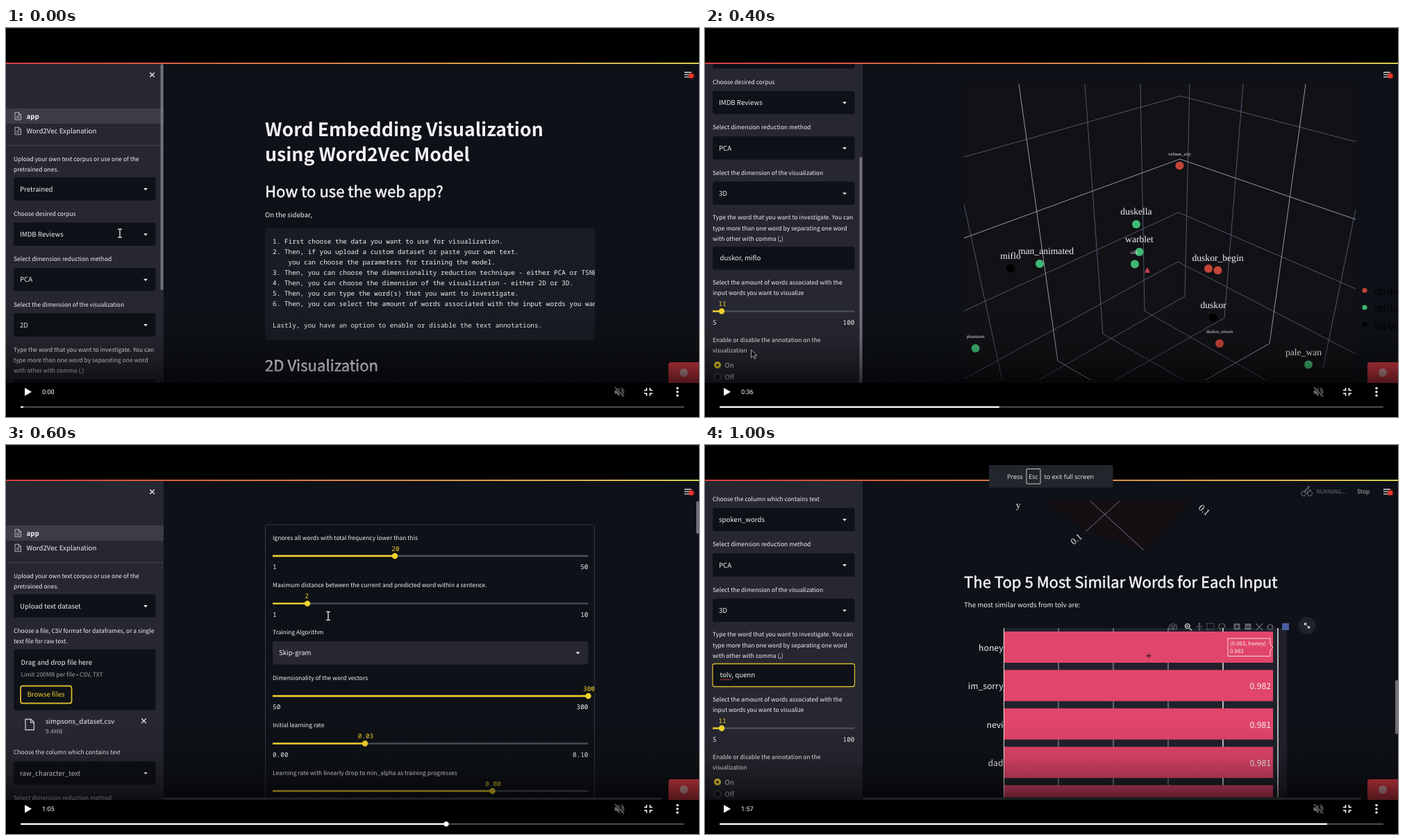
These frames come from a looping animation (998 px wide and 561 px high, 1.2 s). An HTML page:

```html
<!DOCTYPE html>
<html lang="en">
<head>
<meta charset="utf-8">
<title>Word embedding demo</title>
<style>
html, body { margin: 0; height: 100%; overflow: hidden; background: #000; }
svg { display: block; }
#stage { width: 100vw; height: 100vh; }
text { font-family: "Noto Sans CJK JP", "Noto Sans CJK SC", "Noto Sans CJK", "Noto Sans", sans-serif; fill: #f2f2f4; white-space: pre; text-rendering: geometricPrecision; }
.m { font-family: "Noto Sans Mono", "Liberation Mono", monospace; }
.s { font-family: "Liberation Serif", "Noto Serif", serif; }
.r { font-family: Roboto, sans-serif; }
.o { font-family: "Open Sans", sans-serif; }
.c { text-anchor: middle; }
.e { text-anchor: end; }
.b { font-weight: 700; }
.h { stroke: #f2f2f4; stroke-width: .55; }
</style>
</head>
<body>
<svg id="stage" viewBox="0 0 998 561"></svg>
<script>
const BG = '#0e1117', SIDE = '#262730', YEL = '#f2d32c', GOLD = '#d6b82e', RED = '#c24537', GRN = '#3fb873', PINK = '#e2456a';
const LABEL = 8.47, BODY = 9.68, HEAD = 22.1, MONO = 9.4;

const text = (x, y, s, size = LABEL, cls = '', extra = '') =>
  `<text x="${x}" y="${y}" font-size="${size}" class="${cls}" ${extra}>${s}</text>`;
const rect = (x, y, w, h, fill, extra = '') =>
  `<rect x="${x}" y="${y}" width="${w}" height="${h}" fill="${fill}" ${extra}/>`;
const dot = (x, y, r, fill, extra = '') => `<circle cx="${x}" cy="${y}" r="${r}" fill="${fill}" ${extra}/>`;
const path = (d, stroke, w = 1, fill = 'none') => `<path d="${d}" stroke="${stroke}" stroke-width="${w}" fill="${fill}"/>`;
const poly = (points, fill) => `<polygon points="${points}" fill="${fill}"/>`;
const clip = (x, y, w, h, body) =>
  `<svg x="${x}" y="${y}" width="${w}" height="${h}" viewBox="${x} ${y} ${w} ${h}">${body}</svg>`;
const lines = (x, y, step, rows, size, cls) => rows.map((s, i) => text(x, y + i * step, s, size, cls)).join('');
const move = (x, y, body) => `<g transform="translate(${x} ${y})">${body}</g>`;
const heading = (y, s) => text(373, y, s, HEAD, 'h');

const arrow = (x, y) => poly(`${x - 3},${y - 1.4} ${x + 3},${y - 1.4} ${x},${y + 1.8}`, '#f2f2f4');
const select = (cy, s) => rect(11, cy - 16.7, 204.5, 33.4, BG, 'rx="3"') + text(20, cy + 3.6, s, BODY) + arrow(201, cy + .5);
const field = (cy, s, focus) =>
  rect(11, cy - 16.5, 204.5, 33, BG, `rx="3" ${focus ? `stroke="${GOLD}" stroke-width="1.3"` : ''}`) + s;
const slider = (y, x0, x1, x, val, lo, hi) =>
  path(`M${x0} ${y}H${x1}`, '#4c4e57', 2.4) + path(`M${x0} ${y}H${x}`, YEL, 2.4) + dot(x, y, 4.2, YEL) +
  text(x + (val.length > 1 ? 1 : -1), y - 7.5, val, MONO, 'm c', `style="fill:${YEL}"`) +
  text(x0, y + 19, lo, MONO, 'm') + text(x1, y + 19, hi, MONO, 'm e');
const pointer = (x, y) => move(x, y, path('M0 0V11.5L2.8 9L4.8 13.2L6.6 12.3L4.7 8.3H8.3Z', '#ddd', 1, '#111'));
const caret = (x, y) => path(`M${x - 3} ${y - 6}H${x + 3}M${x} ${y - 6}V${y + 6}M${x - 3} ${y + 6}H${x + 3}`, '#ccc', 1.6);
const page = (x, y, k = 1) => move(x, y, `<g transform="scale(${k})">` +
  path('M0 0H5.5L8.5 3V10.5H0ZM5.2 0V3.3H8.5' + (k > 1 ? '' : 'M2 5.5H6.5M2 7.8H6.5'), '#c8c8cc', .9) + '</g>');
const cross = (x, y, r) => path(`M${x - r} ${y - r}l${2 * r} ${2 * r}m0 ${-2 * r}l${-2 * r} ${2 * r}`, '#eee', 1.3);
const bar = (x, y, h) => rect(x, y, 4, h, '#70717a', 'rx="2"');
const hbar = rect(227, 508.5, 718, 3, '#55565e', 'rx="1.5"');

const PICK = 'Select dimension reduction method', DIM = 'Select the dimension of the visualization';
const TYPE = ['Type the word that you want to investigate. You can', 'type more than one word by separating one word', 'with other with comma (,)'];

function sideTop() {
  return cross(210.5, 67.5, 3.3) + rect(0, 116, 227, 22, '#3b3c47') + page(13, 121.8) + page(13, 143.2) +
    text(29.5, 130.6, 'app', BODY, 'b') + text(29.5, 152, 'Word2Vec Explanation', BODY) +
    path('M0 169.5H227', '#41424b') +
    lines(11, 191.8, 15.2, ['Upload your own text corpus or use one of the', 'pretrained ones.']);
}

function sideTail(dy, title, corpus, dim, input, focus, x, val) {
  const radio = (y, s, on) => dot(18, y, 5, on ? YEL : '#1b1c23', on ? '' : 'stroke="#777"') +
    (on ? dot(18, y, 1.8, SIDE) : '') + text(28.5, y + 3.6, s, BODY);
  return move(0, dy, text(11, 81, title) + select(107.5, corpus) + text(11, 146.3, PICK) + select(173, 'PCA') +
    text(11, 211.6, DIM) + select(238.3, dim) + lines(11, 276.4, 15.1, TYPE) + field(332, input, focus) +
    lines(11, 370.2, 15.1, ['Select the amount of words associated with the', 'input words you want to visualize']) +
    slider(408.5, 11, 215.5, x, val, '5', '100') +
    lines(11, 453, 15.1, ['Enable or disable the annotation on the', 'visualization']) +
    radio(486, 'On', true) + radio(503.5, 'Off', false));
}

const scene = (side, main) => rect(0, 52, 998, 460, BG) + main + rect(0, 52, 227, 460, SIDE) + clip(0, 52, 227, 460, side) +
  path('M977 64H987M977 67.3H987M977 70.6H987', '#ddd', 1.3) + dot(987, 69, 5, '#ff2a20', 'opacity=".3"') + dot(987, 69, 3.2, '#f0352b');

function intro() {
  const steps = ['1. First choose the data you want to use for visualization.',
    '2. Then, if you upload a custom dataset or paste your own text.',
    '    you can choose the parameters for training the model.',
    '3. Then, you can choose the dimensionality reduction technique - either PCA or TSNE.',
    '4. Then, you can choose the dimension of the visualization - either 2D or 3D.',
    '5. Then, you can type the word(s) that you want to investigate.',
    '6. Then, you can select the amount of words associated with the input words you want.', '',
    'Lastly, you have an option to enable or disable the text annotations.'];
  const side = sideTop() + select(232, 'Pretrained') + text(11, 271, 'Choose desired corpus') + select(297.3, 'IMDB Reviews') +
    text(11, 336.4, PICK) + select(362.6, 'PCA') + text(11, 401.6, DIM) + select(428, '2D') +
    lines(11, 466.6, 15.1, TYPE) + field(523, '') + bar(222.5, 52, 326) + caret(164, 296);
  return scene(side, lines(373, 156, 35.6, ['Word Embedding Visualization', 'using Word2Vec Model'], 26.7, 'b') +
    heading(243.6, 'How to use the web app?') + text(373, 272.6, 'On the sidebar,', BODY) +
    clip(373, 289, 475, 161, rect(373, 289, 475, 161, '#1a1c24', 'rx="3"') + lines(384, 310.8, 15.1, steps, MONO, 'm')) +
    heading(494.5, '2D Visualization'));
}

function scatter() {
  const words = [[537, 90, ''], [644, 92, ''], [769, 183, 'captivated'], [656, 206, 'cabot'], [562, 214, 'anchorman'],
    [609, 215.5, 'indigenous'], [899, 236, 'cleaning'], [585, 239, 'unsatisfied'], [560, 243, 'dialogue_br'],
    [458, 254.5, 'python'], [472.5, 253.5, 'lionel'], [677, 266, 'sympathetically'], [632, 290, 'sherwood'],
    [648, 286, 'baked'], [657, 287, 'naked'], [643, 304.5, 'understated_performance'], [715, 303.5, 'propelled'],
    [601, 310.5, 'deep'], [539, 306, 'aria'], [669, 323.5, 'rebellious'], [656, 329, 'observant'], [609, 329, 'copy'],
    [611, 328, 'wear'], [611, 367, 'wont'], [615, 382, 'acquiring'], [565, 386, 'calling'], [482, 381.5, 'mocked'],
    [503, 388, 'elected'], [423, 391, 'line_delivered'], [501, 418, 'tragic_event'], [692, 408, 'periodically'],
    [622, 447, 'observed'], [529, 476, 'udo_benno'], [531, 492, 'paragraph'], [648, 507, 'heartwarming']];
  const grid = [460.5, 538, 615, 692, 769, 847].map(x => `M${x} 81V508`).join('') + [88, 202, 316, 430.5].map(y => `M384 ${y}H937`).join('');
  const side = rect(11, 25, 204.5, 33.4, BG, `rx="3" stroke="${GOLD}" stroke-width="1.3"`) +
    sideTail(0, 'Choose desired corpus', 'IMDB Reviews', '2D', '', false, 11, '5');
  return scene(side, clip(384, 81, 553, 427, rect(384, 81, 553, 427, SIDE) + path(grid, '#2e3a4c') + path('M615 81V508M384 316H937', '#2e3a4c') +
      words.map(([x, y]) => dot(x, y, 8.4, '#000')).join('') + words.map(([x, y, s]) => text(x, y - 13, s, 10.05, 's c')).join('')) +
    ['2', '1', '0', '−1'].map((s, i) => text(383, 92 + i * 114.2, s, 10.05, 's e')).join('') +
    dot(950, 297, 5.4, '#000') + text(964, 303.5, 'input', 17, 's', 'style="fill:#000"') + hbar + bar(994, 250, 152)) + pointer(242.5, 310);
}

// Markers are [x, y, label, colour, text size, label x offset].
const marks = list => list.map(([x, y, , col]) => dot(x, y, 6, col || RED)).join('') +
  list.map(([x, y, s, , size = 13.6, dx = 0]) => text(x + dx, y - (size < 10 ? 15 : 14), s, size, 's c')).join('');
const legend = (y, rows) => rows.map(([s, col], i) => dot(950, y + i * 24.5, 3.6, col) +
  text(964, y + 6 + i * 24.5, s, 16, 's', 'style="fill:#000"')).join('');
const cube = (dim, bright) => rect(373, 81, 564, 427, '#121115') + path(dim, '#566079', .9) + path(bright, '#a4a9b6', .9);

function spaceA() {
  const dim = 'M373 186L685 98L937 164M373 408L682 266L937 376M373 506L681 337L937 470M547 81L573 441L690 508M627 81L633 408L808 508' +
    'M698 81L691 387L480 508M775 81L748 418L590 508M373 254L428 508M937 262L890 490';
  const bright = 'M373 303L684 189L937 276M452 81L508 480L556 508M865 81L813 455L720 508';
  const side = rect(11, 25, 204.5, 33.4, BG, 'rx="3"') +
    sideTail(0, 'Choose desired corpus', 'IMDB Reviews', '3D', text(21.5, 335.4, 'duskor, miflo', BODY), false, 24, '11') + bar(222.5, 186, 326);
  return scene(side, clip(373, 81, 564, 427, cube(dim, bright) + poly('637,345 641,353 633,353', '#c9424f') +
    marks([[683.5, 198.5, 'velmor_city', RED, 6.8], [621, 283, 'duskella', GRN], [625.5, 323, 'warblet', GRN],
      [619, 340.5, 'villi', GRN, 6.8, -1], [482, 340, 'man_animated', GRN, 13.6, 9], [440, 346.5, 'miflo', '#000'],
      [725, 347, '', RED], [738.5, 349.5, 'duskor_begin', RED, 13.6], [732, 417.5, 'duskor', '#000'],
      [741, 455, 'duskor_return', RED, 6.8], [389.5, 462, 'phantasm', GRN, 6.8], [869, 485.5, 'pale_wan', GRN, 13.6, -7]])) +
    legend(378.5, [['duskor', RED], ['miflo', GRN], ['input', '#000']])) + pointer(66.5, 464);
}

function training() {
  const side = sideTop() + select(232, 'Upload text dataset') +
    lines(11, 270.5, 15.1, ['Choose a file, CSV format for dataframes, or a single', 'text file for raw text.']) +
    rect(11, 294.5, 204.5, 88, BG, 'rx="3"') + text(21.5, 317.4, 'Drag and drop file here', BODY) +
    text(21.5, 334.3, 'Limit 200MB per file • CSV, TXT', LABEL, '', 'opacity=".65"') +
    rect(21, 347.5, 73.5, 25, BG, `rx="3" stroke="${GOLD}" stroke-width="1.8"`) +
    text(57.5, 363.4, 'Browse files', BODY, 'c', `style="fill:${YEL}"`) + page(28, 395.5, 1.45) +
    text(57, 401.5, 'simpsons_dataset.csv', BODY) + text(57, 415.8, '9.4MB', LABEL, '', 'opacity=".65"') + cross(198.5, 397.8, 3.3) +
    text(11, 446.3, 'Choose the column which contains text') + select(473, 'raw_character_text') + text(11, 511.5, PICK);
  const controls = [[160, 560, '20', '1', '50', 'Ignores all words with total frequency lower than this'],
    [228.6, 434, '2', '1', '10', 'Maximum distance between the current and predicted word within a sentence.'],
    [362, 838.5, '300', '50', '300', 'Dimensionality of the word vectors'],
    [430.5, 517, '0.03', '0.00', '0.10', 'Initial learning rate'],
    [499, 700.5, '0.00', '', '', 'Learning rate with linearly drop to min_alpha as training progresses']];
  return scene(side, rect(373.5, 115, 474, 420, 'none', 'rx="3" stroke="#34363f"') +
    controls.map(([y, x, val, lo, hi, s]) => text(384, y - 23.3, s) + slider(y, 384, 838.5, x, val, lo, hi)).join('') +
    text(384, 273.3, 'Training Algorithm') + rect(384, 283, 454.5, 33.4, SIDE, 'rx="3"') + text(393, 303.4, 'Skip-gram', BODY) +
    arrow(823.5, 300) + caret(464, 246.5) + hbar + bar(994, 81, 47));
}

const toast = opacity => `<g opacity="${opacity}">` + rect(409, 29, 178.5, 32.5, '#22252c', 'rx="1"') +
  rect(463, 34.5, 20, 21.5, 'none', 'rx="1" stroke="#ddd" stroke-width=".9"') + text(435, 48.7, 'Press', 9, 'o') +
  text(473, 48.7, 'Esc', 9, 'o c') + text(488.5, 48.7, 'to exit full screen', 9, 'o') + '</g>';

function spaceB() {
  const dim = 'M373 220L661 106L937 219M465 81L502 352L700 508M572 314L830 483M629 81L633 283L885 423' +
    'M700 81L693 283L430 435M860 81L827 355L632 508M373 135L424 395L545 508M937 209L907 400L787 508';
  const bright = 'M373 317L661 184L937 317M553 81L572 314M777 81L758 315L488 496';
  const tick = (x, y, s, a) => text(x, y, s, 13.4, 's c', `transform="rotate(${a} ${x} ${y})"`);
  const [top, left, right, mid, low] = ['669.5,200', '593,333', '746.5,333', '670,287', '669.5,314'];
  const gem = poly(`${top} 647,277 ${mid}`, '#ca4062') + poly(`${top} 692,279 ${mid}`, '#e0456a') +
    poly(`${left} 647,277 ${mid}`, '#e2466b') + poly(`${left} ${mid} ${low}`, '#cb4062') +
    poly(`${right} 692,279 ${mid}`, '#d84266') + poly(`${right} ${mid} ${low}`, '#c03c5c');
  const input = rect(21, 324, 64, 15.5, '#2d66bd') + text(21.5, 335.4, 'duskor, miflo', BODY);
  const side = sideTail(-4.4, 'Choose the column which contains text', 'spoken_words', '3D', input, true, 24, '11') + bar(222.5, 246, 242);
  return scene(side, clip(373, 81, 564, 427, cube(dim, bright) +
    marks([[690.5, 174, 'oto'], [768, 189, 'ilka'], [688, 212, 'vims_tavern'], [450, 214, 'greeting'], [865, 238, 'jea.', RED, 13.6, -1],
      [564, 267.5, 'uilt', RED, 13.6, 4], [732.5, 286.5, 'billy'], [743, 284.5, 'millionaire'], [736, 322.5, 'mpliment', RED, 13.6, 6],
      [450, 374, 'ruud'], [593, 376, 'open_door']]) + gem +
    tick(387, 409, '0.05', -32) + tick(418, 451, '−0.05', -32) + tick(477, 510, '0', -32) +
    tick(895, 438, '−0.05', 34) + tick(836, 493, '0', 34)) + legend(275.5, [['duskor', RED], ['input', '#000']])) +
    pointer(5, 314);
}

function ranking() {
  const rows = [['honey', ''], ['im_sorry', '0.982'], ['nevi', '0.981'], ['dad', '0.981'], ['', '']];
  const grid = [509, 588, 667, 746, 825].map(x => `M${x} 264V508`).join('');
  const tick = (x, y, a) => text(x, y, '0.1', 13.4, 's c', `transform="rotate(${a} ${x} ${y})"`);
  const icons = path('M669 260h2l1-2h4l1 2h2v6h-10zM674 261.2a1.8 1.8 0 1 0 .1 0M712 257v10M707 262h10M710.5 258.5l1.5-1.5l1.5 1.5M710.5 265.5l1.5 1.5l1.5-1.5', '#62656f', 1.2) +
    rect(723, 257.5, 10, 9, 'none', 'stroke="#62656f" stroke-dasharray="2 1"') +
    path('M741 265c-3-5 1-8 5-7s4 5 0 6s-5 0-4 3M793.5 257.5l9.5 9.5m0-9.5l-9.5 9.5M809.5 262l4.5-4l4.5 4h-1.5v4h-6v-4z', '#62656f', 1.2) +
    path('M698 264.5l3 3M694.7 258a3.3 3.3 0 1 0 .1 0M693 261.3h3.4', '#c5c6ca', 1.5) +
    [766, 782].map(x => rect(x - 4.5, 257.5, 9, 9, '#62656f') + path(`M${x - 3} 262h6`, BG, 1.3)).join('') + path('M766 259v6', BG, 1.3) +
    rect(831, 257, 10, 10, '#4a5f9e');
  const rider = path('M862 66.5a3.5 3.5 0 1 0 .1 0M871 66.5a3.5 3.5 0 1 0 .1 0M863 69l2-5l3 3v4M865 64l3-2l2 3h3M869 59.5a1 1 0 1 0 .1 0', '#767982', 1);
  const input = text(21.5, 335.4, 'tolv, quenn', BODY) + path('M22 338.3q1.2-1.6 2.4 0t2.4 0t2.4 0t2.4 0t2.4 0t2.4 0t2.4 0', '#e04848', .9);
  const side = sideTail(0, 'Choose the column which contains text', 'spoken_words', '3D', input, true, 24, '11');
  return scene(side, poly('490,81 700,81 632,152 548,125', '#130f13') + path('M597 81L548 125M555 81L632 152', '#85878f', .9) +
    text(451, 91, 'y', 13.4, 's c') + tick(537.5, 139, -40) + tick(716, 97, 42) +
    heading(205.5, 'The Top 5 Most Similar Words for Each Input') + text(373, 234.4, 'The most similar words from tolv are:', BODY) +
    clip(373, 264, 465, 244, rect(430, 264, 408, 244, '#20212a') + path(grid, '#b9bac0', .9) + path('M746 264V508M825 264V508', '#eee', 1.2) +
      rows.map(([s, val], i) => rect(430, 269 + i * 55.4, 388, 45, PINK) + text(429.5, 297 + i * 55.4, s, 12.2, 'e') +
        text(815, 297 + i * 55.4, val, 12.2, 'e')).join('') + path('M430.5 264V508', '#eee')) +
    path('M753 279H814V288L818 292L814 296V304.5H753Z', '#f3d9df', 1, PINK) + text(756, 289.3, '(0.983, honey)', 7.9) + text(756, 300.3, '0.983', 7.9) +
    path('M635.5 304h7M639 300.5v7', '#40202a', 1.4) + icons + dot(867, 260.5, 12.5, '#1f222b') +
    path('M863.5 260v-3h3M863.5 257l3 3M870.5 261v3h-3M870.5 264l-3-3', '#ddd', 1.1) + rider +
    text(880.5, 70, 'RUNNING...', 8, '', 'style="fill:#6c6f78"') + text(939, 70.3, 'Stop', LABEL, '', 'style="fill:#b5b6bb"') + hbar + bar(994, 339, 78));
}

const shade = rect(0, 400, 998, 112, 'url(#fade)') + rect(0, 512, 998, 49, '#000');
const player = rect(0, 0, 998, 1, '#1c1d22') + rect(0, 50, 998, 1.8, 'url(#top)') +
  poly('27,519 27,530.5 37,524.8', '#fff') +
  path('M919 522.5h3.5v-3.5M931 522.5h-3.5v-3.5M919 527h3.5v3.5M931 527h-3.5v3.5', '#fff', 1.6) +
  [519.5, 524.7, 530].map(y => dot(967, y, 1.7, '#fff')).join('') +
  path('M876.5 522.5h3l4-4v13l-4-4h-3z', 'none', 0, '#666') + path('M886 521.5q3 3.3 0 6.5M886 518.5q7.5 6.3 0 12.5', '#666', 1.3) +
  path('M877 518l13 13.5', '#000', 3) + path('M877 518l13 13.5', '#777', 1.3) + rect(21, 545.5, 956, 2.2, '#4a4a4a', 'rx="1"');
const badge = rect(954, 482, 50, 34, '#d23a45', 'rx="4"') + dot(976, 497, 6, '#d09a9e');

// Each shot: scene, clock, progress end, toast opacity.
const shots = [[intro, '0:00', 25, 0], [scatter, '0:08', 150, 0], [spaceA, '0:36', 424, 0],
  [training, '1:05', 634, 0], [spaceB, '1:50', 891, .4], [ranking, '1:57', 896, 1]];
const stage = document.getElementById('stage');
stage.innerHTML = `<defs>
  <linearGradient id="fade" x2="0" y2="1"><stop stop-opacity="0"/><stop offset=".45" stop-opacity=".1"/><stop offset=".75" stop-opacity=".32"/><stop offset="1" stop-opacity=".62"/></linearGradient>
  <linearGradient id="top"><stop stop-color="#f0454a"/><stop offset="1" stop-color="#f3e35a"/></linearGradient></defs>` +
  shots.map(([draw, time, x, note]) => `<g class="shot">${draw()}${badge}${shade}${player}` + (note ? toast(note) : '') +
    text(52, 527.9, time, 9.2, 'r', 'style="fill:#fff"') + rect(21, 545.5, x - 21, 2.2, '#fff', 'rx="1"') +
    (draw === training ? dot(x, 546.6, 3.6, '#fff') : '') + '</g>').join('');

const groups = [...stage.querySelectorAll('.shot')];
function tick() {
  const now = Math.floor(performance.now() % 1200 / 200);
  groups.forEach((g, i) => g.style.display = i === now ? '' : 'none');
  requestAnimationFrame(tick);
}
tick();
</script>
</body>
</html>
```
